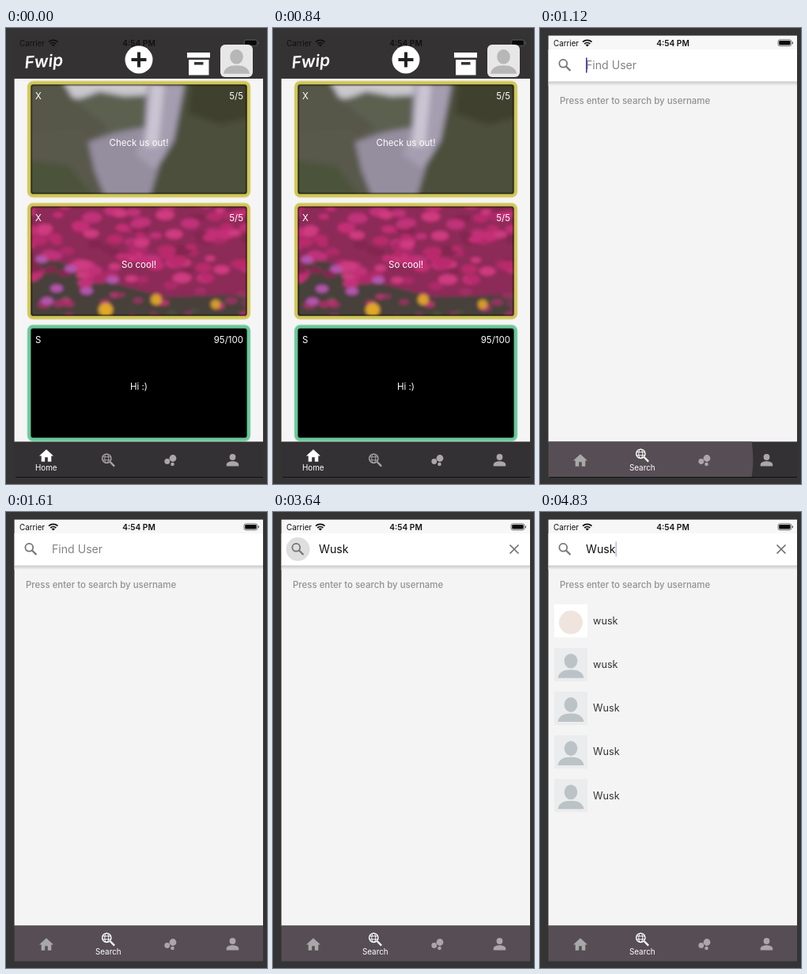
Animation, 330 px wide and 576 px high, one loop 4.9 s. Source, as an HTML page:

```html
<!DOCTYPE html>
<html lang="en">
<head>
<meta charset="utf-8">
<title>User search</title>
<style>
  html, body { margin: 0; width: 100%; height: 100%; overflow: hidden; background: #353434; }
  svg { display: block; width: 100vw; height: 100vh; }
  text { font-family: Inter, Roboto, sans-serif; white-space: pre; }
</style>
</head>
<body>
<svg id="stage" viewBox="0 0 330 576"></svg>
<script>
const LOOP = 4900, STEP = 70;
const USER = 'Wusk';
const LEFT = 10.6, WIDTH = 314.4, TOP = 9.6, BAR = 522.5;
const stage = document.getElementById('stage');

let seed = 11;
const rand = (a, b) => {
  seed = (seed * 16807) % 2147483647;
  return a + (b - a) * seed / 2147483647;
};
const clamp = v => Math.max(0, Math.min(1, v));
const mix = (a, b, k) => a + (b - a) * k;

const rect = (x, y, w, h, fill, extra = '') =>
  `<rect x="${x}" y="${y}" width="${w}" height="${h}" fill="${fill}" ${extra}/>`;
const circle = (x, y, r, fill, extra = '') =>
  `<circle cx="${x}" cy="${y}" r="${r}" fill="${fill}" ${extra}/>`;
const path = (d, fill, extra = '') => `<path d="${d}" fill="${fill}" ${extra}/>`;
const line = (d, color, w, extra = '') =>
  `<path d="${d}" fill="none" stroke="${color}" stroke-width="${w}" ${extra}/>`;
const text = (x, y, size, fill, str, extra = '') =>
  `<text x="${x}" y="${y}" font-size="${size}" fill="${fill}" ${extra}>${str}</text>`;
const band = (y, h, fill, extra) => rect(LEFT, y, WIDTH, h, fill, extra);
const MID = 'text-anchor="middle"', END = 'text-anchor="end"';

// Home screen
function waterfall() {
  return `<g filter="url(#soft)">
    ${rect(20, 60, 300, 160, '#5f5f55')}
    ${path('M66 60H186V84L150 86 118 80 92 90 74 84Z', '#cbc8cd')}
    ${path('M20 60H68L84 88 110 104 130 128 100 142 20 136Z', '#56564a')}
    ${path('M84 90L122 84 180 90 178 128 140 132 112 112Z', '#5c6150')}
    ${path('M20 132L96 128 130 144 136 220H20Z', '#58594c')}
    ${path('M104 144L140 132 182 124 204 150 186 220H128L112 180Z', '#958e9f')}
    <g id="fall">${path('M178 70H226L220 118 210 150 188 178 164 160 176 124Z', '#a59eb0')}
    ${path('M184 70H200L192 150H176Z', '#cbc4d3')}</g>
    ${path('M228 60H320V220H180L194 172 212 142Z', '#4b4f3a')}
    ${path('M236 60H320V110L272 122 230 108Z', '#3f402f')}
    ${path('M20 166L80 174 116 220H20Z', '#4b523a')}
  </g>`;
}

function blobs(n, y0, y1, r0, r1, colors) {
  let out = '';
  for (let i = 0; i < n; i++) {
    const rx = rand(r0, r1);
    out += `<ellipse cx="${rand(28, 310)}" cy="${rand(y0, y1)}" rx="${rx}" ry="${rx * .55}"
      fill="${colors[i % colors.length]}"/>`;
  }
  return out;
}

function flowers() {
  return `<g filter="url(#petal)">
    ${rect(20, 215, 300, 160, '#8c2a58')}
    ${path('M20 288L70 296 120 318 200 340 320 336V375H20Z', '#46403b')}
    <g id="back">${blobs(60, 222, 326, 7, 13, ['#ad2a69', '#83284f', '#c03079'])}
    ${blobs(18, 326, 366, 5, 9, ['#a02f66', '#4c4e3e', '#7c3458'])}</g>
    <g id="front">${blobs(60, 224, 322, 6, 12, ['#c42f76', '#cf3a80', '#b92c6c'])}
    ${blobs(9, 330, 352, 5, 9, ['#b93070', '#943260'])}</g>
    <g id="violet">${[[64, 329], [82, 304], [45, 292], [135, 318], [52, 345], [102, 332]]
      .map(([x, y]) => `<ellipse cx="${x}" cy="${y}" rx="8" ry="5" fill="#b455ac"/>`).join('')}</g>
    ${circle(126, 356, 9, '#e2a726')}${circle(190, 343, 7, '#dca02b')}${circle(265, 349, 6, '#d79c28')}
  </g>`;
}

function post(y, color, tag, count, label, art) {
  const frame = (fill, w, opacity) => rect(29.3, y + 2.3, 277.4, 142.4, fill,
    `rx="5" stroke="${color}" stroke-width="${w}" stroke-opacity="${opacity}"`);
  return frame('#000', 5.4, .5)
    + `<g clip-path="url(#clip${y})">${art}</g>`
    + rect(32, y + 5, 272, 137, 'none', 'rx="3" stroke="#000" stroke-width="2.5" stroke-opacity=".4"')
    + frame('none', 3.8, 1)
    + `<clipPath id="clip${y}">${rect(31.5, y + 4.5, 273, 138, '#fff', 'rx="3"')}</clipPath>`
    + text(37, y + 22.8, 11.5, '#fff', tag)
    + text(300, y + 22.8, 11.5, '#fff', count, END)
    + text(168, y + 81.5, 11.5, '#fff', label, MID);
}

const person = (x, y, fill) => `<g transform="translate(${x} ${y})">
  <ellipse cy="-4.5" rx="8.3" ry="9.3" fill="${fill}"/>
  ${path('M-16.5 17C-15.5 9.5-9 6.5 0 6.5S15.5 9.5 16.5 17Z', fill)}</g>`;

function home() {
  return band(TOP, 54.4, '#343233') + band(64, 459, '#f5f5f5')
    + post(67, '#d0c656', 'X', '5/5', 'Check us out!', waterfall())
    + post(221, '#d0c656', 'X', '5/5', 'So cool!', flowers())
    + post(375, '#68c899', 'S', '95/100', 'Hi :)', '');
}

function homeHeader() {
  return text(24, 51, 21, '#fff', 'Fwip', 'font-weight="600" font-style="italic" transform="rotate(-4 24 51)"')
    + circle(168, 40, 17.5, '#fff') + line('M158.5 40H177.5M168 30.5V49.5', '#242324', 4)
    + rect(229, 31, 29, 6.5, '#fff') + path('M231 40H256.5V59.5H231Z', '#fff')
    + rect(238, 43, 11.5, 3.5, '#343233')
    + rect(271, 21, 41, 41, '#e7e7e7', 'rx="6"') + person(291.5, 40.8, '#b7b7b7');
}

function status() {
  return text(17, 22.7, 9.8, '#111', 'Carrier')
    + line('M54 17.6A8.5 8.5 0 0 1 65.5 17.6M56.2 20A5.2 5.2 0 0 1 63.3 20', '#111', 1.8)
    + path('M57.5 21.3Q59.8 19.8 62 21.3L59.8 23.6Z', '#111')
    + text(168, 22.7, 10.2, '#111', '4:54 PM', MID + ' font-weight="600"')
    + rect(301, 14.8, 16.8, 8, 'none', 'rx="2.4" stroke="#555" stroke-width=".8"')
    + rect(302.2, 16, 14.4, 5.6, '#0a0a0a', 'rx="1.3"')
    + rect(318.8, 17.3, 1.2, 3, '#555', 'rx=".6"');
}

// Search screen
function results() {
  return [0, 1, 2, 3, 4].map(i => {
    const y = 137.5 + i * 55.2;
    const face = i ? rect(18, y - 21, 42, 42, '#eaeced') + person(39, y, '#bcc3c6')
      : rect(18, y - 21, 42, 42, '#fff') + circle(39, y + 2, 15, '#f0e5de', 'id="pic"');
    return face + text(67, y + 4.2, 12.7, '#333', i < 2 ? USER.toLowerCase() : USER);
  }).join('');
}

function search() {
  return band(TOP, 17.4, '#f7f7f7') + band(27, 496, '#f4f4f4')
    + band(66, 7, 'url(#shade)') + band(27, 40.5, '#fff')
    + circle(31.5, 47, 15, '#dedede', 'id="press"')
    + circle(29.3, 44.8, 4.9, 'none', 'stroke="#757575" stroke-width="1.8"')
    + line('M33 48.5L38.5 54', '#757575', 2.2)
    + text(58, 52.3, 14.1, '#828282', 'Find User', 'id="hint"')
    + text(58, 52.3, 14.1, '#111', '', 'id="query"')
    + line('M299.5 41.5L310.5 52.5M310.5 41.5L299.5 52.5', '#6d6d6d', 1.6, 'id="clear"')
    + rect(0, 37.5, 1.6, 19, '#4338a5', 'id="caret"')
    + text(25, 96, 11.45, '#919191', 'Press enter to search by username', 'font-weight="500"')
    + `<g id="results">${results()}</g>`;
}

// Tab bar
const globe = c => circle(-2, -2, 5.7, 'none', `stroke="${c}" stroke-width="1.4"`)
  + `<ellipse cx="-2" cy="-2" rx="2.5" ry="5.7" fill="none" stroke="${c}"/>`
  + line('M-7.4 -4H3.4M-7.4 0H3.4', c, 1) + line('M2.5 2.5L7.8 7.8', c, 2.3);

function tabs() {
  const grey = '#aaa6a9';
  return band(BAR, 45, '#333133')
    + `<g clip-path="url(#bar)">${circle(129, 545, 0, '#564e54', 'id="wave"')}</g>`
    + line('M12 567.5H325', '#111', 1, 'id="rule"')
    + '<g id="tab0"><path d="M10 20v-6h4v6h5v-8h3L12 3 2 12h3v8z" transform="scale(.9) translate(-12 -11.5)"/></g>'
    + `<g id="tab1"><g id="off">${globe(grey)}</g><g id="on">${globe('#fff')}</g></g>`
    + circle(211, 543.5, 4.4, grey) + circle(203.8, 547.5, 3.4, grey) + circle(210.5, 551, 2.3, grey)
    + circle(286.5, 542, 3.9, grey)
    + path('M278.8 553.5V551.3C278.8 548.6 283.5 547.3 286.5 547.3S294.2 548.6 294.2 551.3V553.5Z', grey)
    + text(50.8, 558.7, 9.9, '#fff', 'Home', MID + ' id="label0"')
    + text(129.3, 558.7, 9.9, '#fff', 'Search', MID + ' id="label1"');
}

stage.innerHTML = `<defs>
    <filter id="soft"><feGaussianBlur stdDeviation="3.5"/></filter>
    <filter id="petal"><feGaussianBlur stdDeviation="2.2"/></filter>
    <linearGradient id="shade" x2="0" y2="1">
      <stop stop-color="#bcbcbc"/><stop offset="1" stop-color="#f4f4f4"/></linearGradient>
    <clipPath id="bar">${band(BAR, 45, '#fff')}</clipPath>
  </defs>${rect(0, 0, 330, 576, '#353434')}
  <g id="home">${home()}</g><g id="search">${search()}</g>
  ${status()}<g id="head">${homeHeader()}</g>${tabs()}`;

const el = {};
stage.querySelectorAll('[id]').forEach(node => el[node.id] = node);
const set = (id, name, value) => el[id].setAttribute(name, value);
const show = (id, on) => set(id, 'display', on ? 'inline' : 'none');
const fade = (id, v) => set(id, 'opacity', v);
const move = (id, x, y) => set(id, 'transform', `translate(${x} ${y})`);

const ease = k => k < .5 ? Math.pow(2 * k, 1.75) / 2 : 1 - Math.pow(2 - 2 * k, 1.75) / 2;

// Each pair is [start time, direction] of a three-step caret fade.
const BLINKS = [[1470, -1], [1890, 1], [3360, -1], [3780, 1], [4410, -1], [4830, 1]];
function caretAlpha(t) {
  let alpha = 1;
  for (const [start, dir] of BLINKS) {
    if (t < start) break;
    const k = clamp((t - start + STEP) / (3 * STEP));
    alpha = dir > 0 ? k : 1 - k;
  }
  return alpha;
}

function typed(t) {
  if (t < 2310) return 0;
  return 1 + Math.max(0, Math.min(3, Math.floor((t - 2590) / STEP)));
}

let shown = -1;
function update(t) {
  const searching = t >= 910;
  show('home', !searching);
  show('head', !searching);
  show('search', searching);

  const sway = t / 840;
  move('fall', 0, 2 * Math.sin(sway * 6));
  move('back', -2 * sway, sway);
  move('front', 2 * Math.sin(sway * 4), 2 * sway);
  move('violet', -2 * sway, 3 * Math.sin(sway * 3));

  const count = typed(t);
  if (count !== shown) {
    el.query.textContent = USER.slice(0, count);
    shown = count;
  }
  show('hint', !count);
  show('clear', count);
  const width = count && searching ? el.query.getComputedTextLength() : 0;
  set('caret', 'x', 58 + width);
  fade('caret', caretAlpha(t));

  fade('press', t < 3640 ? 0 : clamp(1 - (t - 3640) / 280));
  show('results', t >= 3780);
  show('pic', t >= 3850);

  const k = clamp((t - 910) / 150);
  set('wave', 'r', 313 * ease(clamp((t - 932) / 400)));
  fade('rule', t < 1190 ? 1 : 0);
  move('tab0', 51, mix(540, 546, k));
  const shade = Math.round(mix(255, 168, k));
  set('tab0', 'fill', `rgb(${shade},${shade},${shade})`);
  move('tab1', 129.3, mix(545.8, 539.8, k));
  fade('off', 1 - k);
  fade('on', k);
  fade('label0', 1 - k);
  fade('label1', k);
}

const begin = performance.now();
function tick() {
  const t = (performance.now() - begin) % LOOP;
  update(Math.floor(t / STEP) * STEP);
  requestAnimationFrame(tick);
}
update(0);
tick();
</script>
</body>
</html>
```
